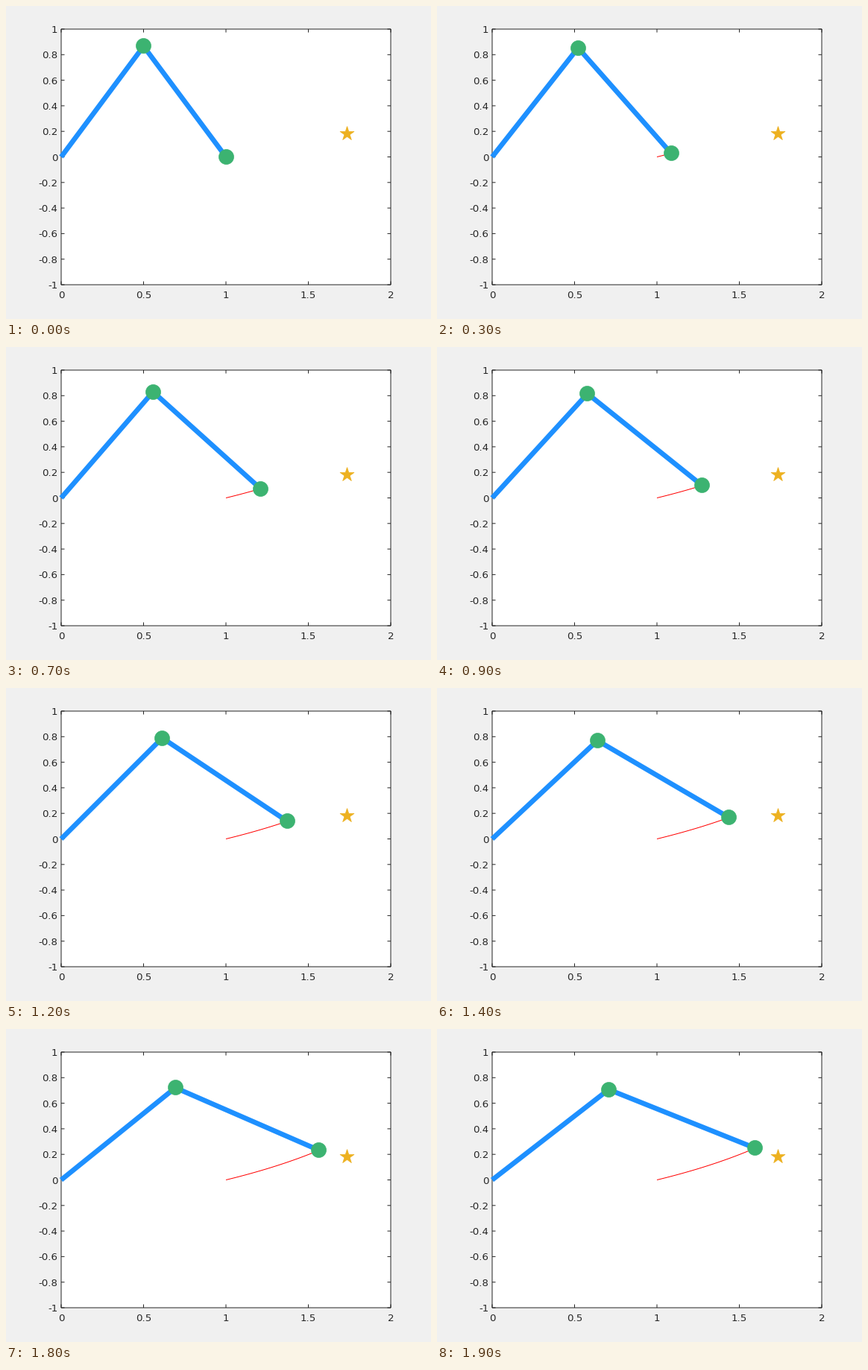
Write a matplotlib script that moves like this. It is 570x420 px and loops after 2 s.

```python
import numpy as np
import matplotlib.pyplot as plt
from matplotlib.animation import FuncAnimation
from matplotlib.patches import Circle, Polygon, Rectangle

W, H, DPI = 570, 420, 100
PX = 72 / DPI  # points per pixel
LEFT, RIGHT, TOP, BOTTOM = 74, 516, 31, 374
FRAMES, INTERVAL = 20, 100

INK = "#262626"
BLUE = "#1e90ff"
GREEN = "#3cb371"
GOLD = "#edb120"

plt.rcParams["font.family"] = "DejaVu Sans"
fig = plt.figure(figsize=(W / DPI, H / DPI), dpi=DPI, facecolor="#f0f0f0")
ax = fig.add_axes([0, 0, 1, 1])
ax.set_xlim(0, W)
ax.set_ylim(H, 0)
ax.axis("off")


def to_px(x, y):
    """Plot units to stage pixels."""
    return (LEFT + (RIGHT - LEFT) * x / 2,
            TOP + (BOTTOM - TOP) * (1 - y) / 2)


def marker_px(x, y):
    """Markers sit on pixel centres."""
    return np.floor(to_px(x, y)) + 0.5


def line(xs, ys, color, width, z):
    return ax.plot(xs, ys, color=color, lw=width * PX, zorder=z, snap=False,
                   solid_capstyle="butt")[0]


def label(x, y, value, align):
    ax.text(x, y, f"{value:g}", ha=align, va="baseline", color=INK,
            fontsize=13.33 * PX, parse_math=False)


def draw_axes():
    ax.add_patch(Rectangle((LEFT, TOP), RIGHT - LEFT, BOTTOM - TOP, fc="white",
                           ec=INK, lw=PX, snap=False, zorder=1))
    tick = 4.5
    for i in range(5):
        x = to_px(i / 2, 0)[0]
        line([x, x], [BOTTOM, BOTTOM - tick], INK, 1, 2)
        line([x, x], [TOP, TOP + tick], INK, 1, 2)
        label(x, 392, i / 2, "center")
    for i in range(-5, 6):
        y = to_px(0, i / 5)[1]
        line([LEFT, LEFT + tick], [y, y], INK, 1, 2)
        line([RIGHT, RIGHT - tick], [y, y], INK, 1, 2)
        label(69.5, y + 5, i / 5, "right")


def draw_star(x, y, r):
    cx, cy = marker_px(x, y)
    a = np.arange(10) * np.pi / 5
    rad = np.where(np.arange(10) % 2, 0.382 * r, r)
    pts = np.column_stack([cx + rad * np.sin(a), cy - rad * np.cos(a)])
    ax.add_patch(Polygon(pts, fc=GOLD, ec=GOLD, lw=0.67 * PX, zorder=3))


def pose(n):
    """Elbow and hand after n steps; both links have length 1."""
    upper = np.radians(60 - n * (0.4185 + 0.0195 * n))
    lower = np.radians(-60 + n * (1.42 + 0.0159 * n))
    ex, ey = np.cos(upper), np.sin(upper)
    return (ex, ey), (ex + np.cos(lower), ey + np.sin(lower))


draw_axes()
draw_star(1.735, 0.181, 10)
trail = line([], [], "red", 1, 4)
arm = line([], [], BLUE, 6.67, 5)
joints = [ax.add_patch(Circle((0, 0), 10, fc=GREEN, ec=GREEN,
                              lw=0.67 * PX, zorder=6)) for _ in range(2)]


def update(n):
    elbow, hand = pose(n)
    arm.set_data(*zip(to_px(0, 0), to_px(*elbow), to_px(*hand)))
    for joint, point in zip(joints, (elbow, hand)):
        joint.center = marker_px(*point)
    trail.set_data(*to_px(*pose(np.arange(n + 1))[1]))
    return [trail, arm, *joints]


anim = FuncAnimation(fig, update, frames=FRAMES, interval=INTERVAL,
                     init_func=lambda: update(0), repeat=True, repeat_delay=0)
plt.show()
```
